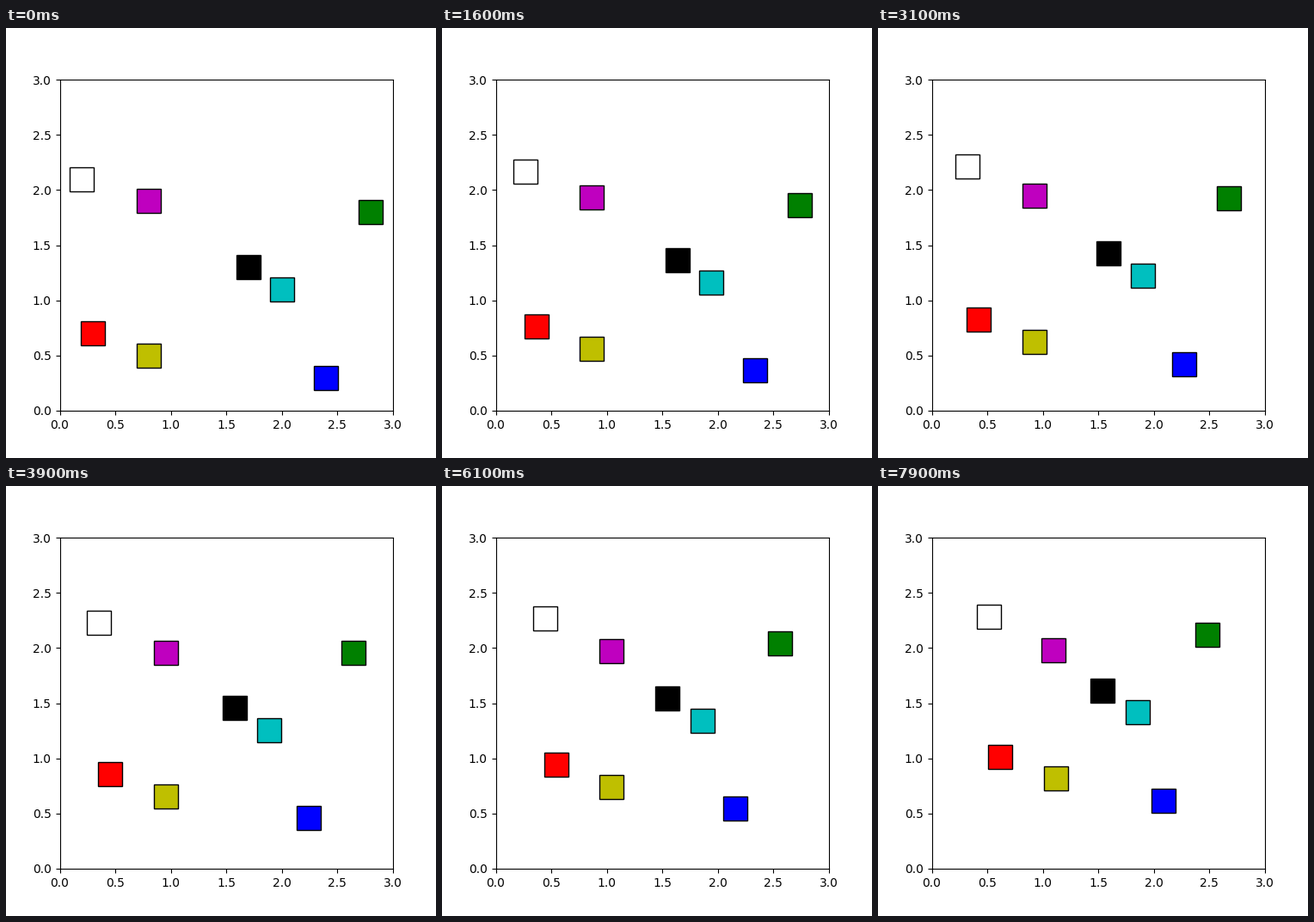
Recreate the animation shown at these times as a matplotlib script. Size 500 px wide and 500 px high, loop 8000 ms.

```python
import numpy as np
import matplotlib.pyplot as plt
from matplotlib.animation import FuncAnimation

FRAMES, INTERVAL = 80, 100
SPEED = 0.004   # top speed per frame along each axis
GAIN = 0.028    # proportional gain close to the goal

# colour, start (x, y), goal (x, y)
AGENTS = [
    ("w", (0.2, 2.1), (1.17, 2.305)),
    ("m", (0.8, 1.9), (1.17, 1.988)),
    ("k", (1.7, 1.3), (1.513, 2.0)),
    ("c", (2.0, 1.1), (1.833, 2.0)),
    ("g", (2.8, 1.8), (1.83, 2.3)),
    ("r", (0.3, 0.7), (1.17, 1.7)),
    ("y", (0.8, 0.5), (1.5, 1.7)),
    ("b", (2.4, 0.3), (1.83, 1.7)),
]
START = np.array([a[1] for a in AGENTS])
GOAL = np.array([a[2] for a in AGENTS])


def positions(n):
    """Saturated proportional control: constant speed, then exponential decay."""
    gap = GOAL - START
    dist = np.abs(gap)
    near = np.minimum(dist, SPEED / GAIN)
    cruise = (dist - near) / SPEED
    left = np.where(n < cruise, dist - SPEED * n,
                    near * (1 - GAIN) ** np.maximum(n - cruise, 0))
    return GOAL - np.sign(gap) * left


fig, ax = plt.subplots(figsize=(5, 5), dpi=100)
ax.set_xlim(0, 3)
ax.set_ylim(0, 3)
markers = [ax.plot([], [], "s", color=color, markersize=20,
                   markeredgecolor="k", markeredgewidth=1)[0]
           for color, _, _ in AGENTS]


def update(n):
    for marker, (x, y) in zip(markers, positions(n)):
        marker.set_data([x], [y])
    return markers


anim = FuncAnimation(fig, update, frames=FRAMES, interval=INTERVAL,
                     init_func=lambda: update(0), repeat=True, repeat_delay=0)
plt.show()
```
